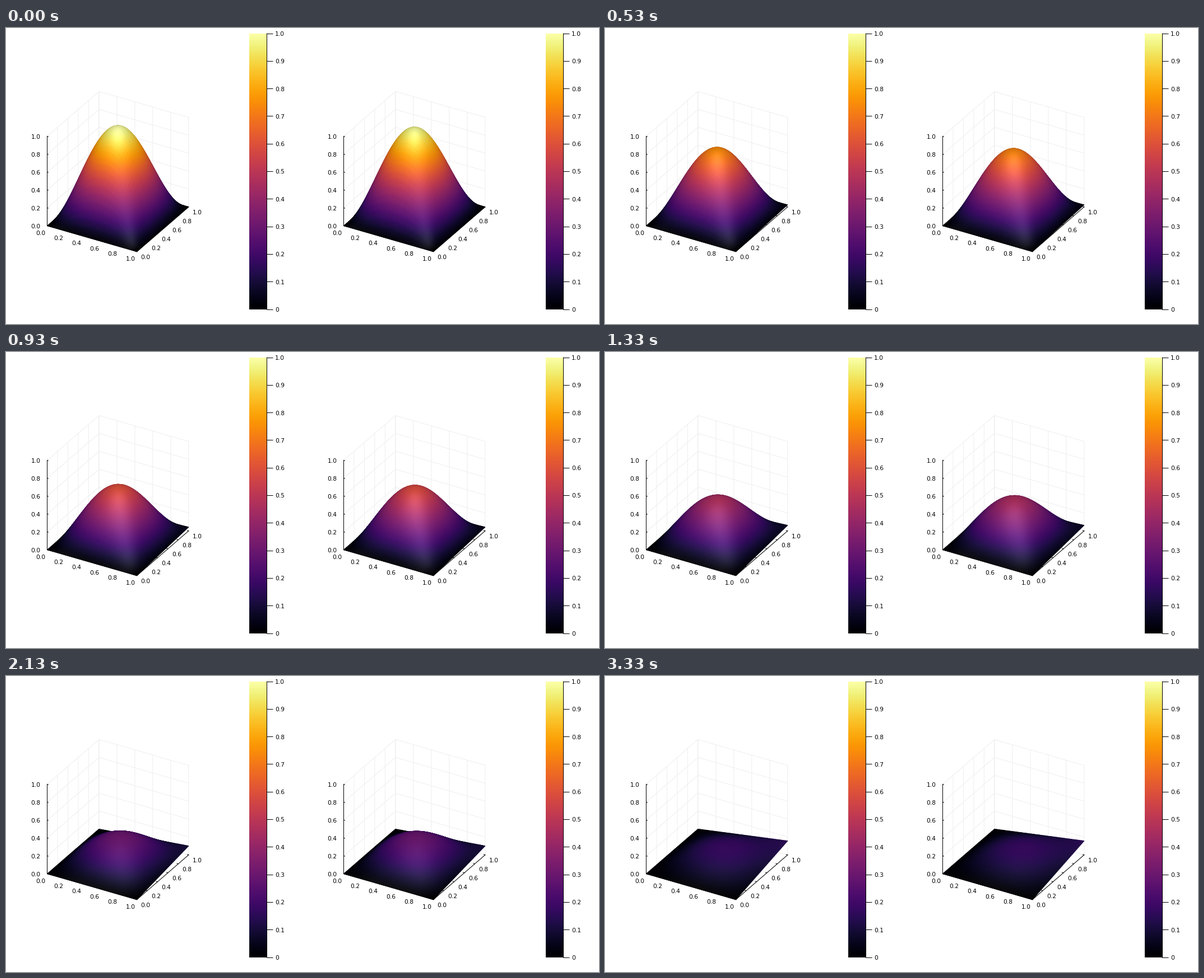
A matplotlib script for the animation above (3360 ms loop, 1058 px wide and 529 px high).

```python
import numpy as np
import matplotlib.pyplot as plt
from matplotlib.animation import FuncAnimation

W, H, DPI = 1058, 529, 100
FRAMES, LOOP_MS = 101, 3360
PANEL = W / 2
PX = 72 / DPI                       # one pixel in points
CELLS = 36

plt.rcParams["font.family"] = "DejaVu Sans"
INFERNO = plt.get_cmap("inferno")

# Orthographic view, azimuth and elevation both 30 degrees
SCALE = 184.75
ORIGIN = 73.5, 353.5
S, C = 0.5, np.sqrt(3) / 2
VIEWER = np.array([C * S, -C * C, S])
GLOSS = VIEWER + [0, 0, 0.3]        # highlight direction, a little above the eye
GLOSS /= np.linalg.norm(GLOSS)

fig = plt.figure(figsize=(W / DPI, H / DPI), dpi=DPI, facecolor="white")
ax = fig.add_axes([0, 0, 1, 1])
ax.axis("off")


def project(x, y, z, left):
    px = left + ORIGIN[0] + SCALE * (C * x + S * y)
    py = ORIGIN[1] + SCALE * (S * S * x - C * S * y - C * z)
    return px, py


def line(xs, ys, color="black", zorder=2):
    ax.plot(xs, ys, color=color, lw=PX, zorder=zorder, snap=False)


def line3d(a, b, left, **style):
    (x0, y0), (x1, y1) = project(*a, left), project(*b, left)
    line([x0, x1], [y0, y1], **style)


def label(x, y, text, ha="center"):
    ax.text(x, y, text, ha=ha, va="center_baseline", fontsize=10.67 * PX)


def draw_box(left):
    for v in np.linspace(0, 1, 6):
        for a, b in [((0, v, 0), (0, v, 1)), ((0, 0, v), (0, 1, v)),
                     ((v, 1, 0), (v, 1, 1)), ((0, 1, v), (1, 1, v)),
                     ((v, 0, 0), (v, 1, 0)), ((0, v, 0), (1, v, 0))]:
            line3d(a, b, left, color="#efefef", zorder=1)

        line3d((v, 0, 0), (v, 0.02, 0), left)
        line3d((1, v, 0), (0.985, v, 0), left)
        line3d((0, 0, v), (0.012, 0, v), left)

        text = f"{v:.1f}"
        x, y = project(v, 0, 0, left)
        label(x - 11.5, y + 12.3, text)
        x, y = project(1, v, 0, left)
        label(x + 15.7, y + 9.7, text)
        x, y = project(0, 0, v, left)
        label(x - 12, y, text, "right")

    for end in [(1, 0, 0), (0, 0, 1)]:
        line3d((0, 0, 0), end, left)
    line3d((1, 0, 0), (1, 1, 0), left)


def draw_colorbar(left):
    x, top, bottom = left + 465.5, 10, 503
    ramp = np.linspace(1, 0, 256)[:, None]
    ax.imshow(ramp, cmap=INFERNO, aspect="auto", interpolation="bilinear",
              extent=(x - 31.5, x + 0.5, bottom, top))
    line([x, x], [top, bottom])
    for i in range(11):
        y = bottom + (top - bottom) * i / 10
        row = np.floor(y) + 0.5
        line([x, x + 10.5], [row, row])
        label(x + 14.5, y, f"{i / 10:.1f}" if i else "0", "left")


def field(x, y, t, gain):
    """Decaying heat mode plus a slowly tilting boundary; value and slopes."""
    a = gain * np.exp(-2 * np.pi**2 * t)
    tilt = np.sin(np.pi * t / 2)
    sx, sy = np.sin(np.pi * x), np.sin(np.pi * y)
    u = a * sx * sy + tilt * x * y
    ux = a * np.pi * np.cos(np.pi * x) * sy + tilt * y
    uy = a * np.pi * sx * np.cos(np.pi * y) + tilt * x
    return u, ux, uy


def shade(u, ux, uy):
    length = np.sqrt(1 + ux**2 + uy**2)

    def facing(d):
        dot = (d[2] - ux * d[0] - uy * d[1]) / length
        return np.clip(dot, 0, 1)[..., None]

    rgb = INFERNO(np.clip(u, 0, 1))[..., :3]
    lit = rgb * (0.8 + 0.2 * facing(VIEWER)) + 0.13 * facing(GLOSS)**12
    return np.clip(lit, 0, 1)


# Rows run from the far side to the near side, so later cells cover earlier ones
steps = np.linspace(0, 1, CELLS + 1)
X, Y = np.meshgrid(steps, steps[::-1])

surfaces = []


def draw_surface(t, left, gain):
    u, ux, uy = field(X, Y, t, gain)
    px, py = project(X, Y, u, left)
    return ax.pcolormesh(px, py, shade(u, ux, uy), shading="gouraud", zorder=3)


def update(k):
    while surfaces:
        surfaces.pop().remove()
    t = k / 1000
    surfaces.append(draw_surface(t, 0, 1.0))
    surfaces.append(draw_surface(t, PANEL, 0.982))
    return surfaces


for panel_left in (0, PANEL):
    draw_colorbar(panel_left)
    draw_box(panel_left)
ax.set_xlim(0, W)
ax.set_ylim(H, 0)

anim = FuncAnimation(fig, update, frames=FRAMES, interval=LOOP_MS / FRAMES,
                     init_func=lambda: update(0), repeat=True, repeat_delay=0)
plt.show()
```
